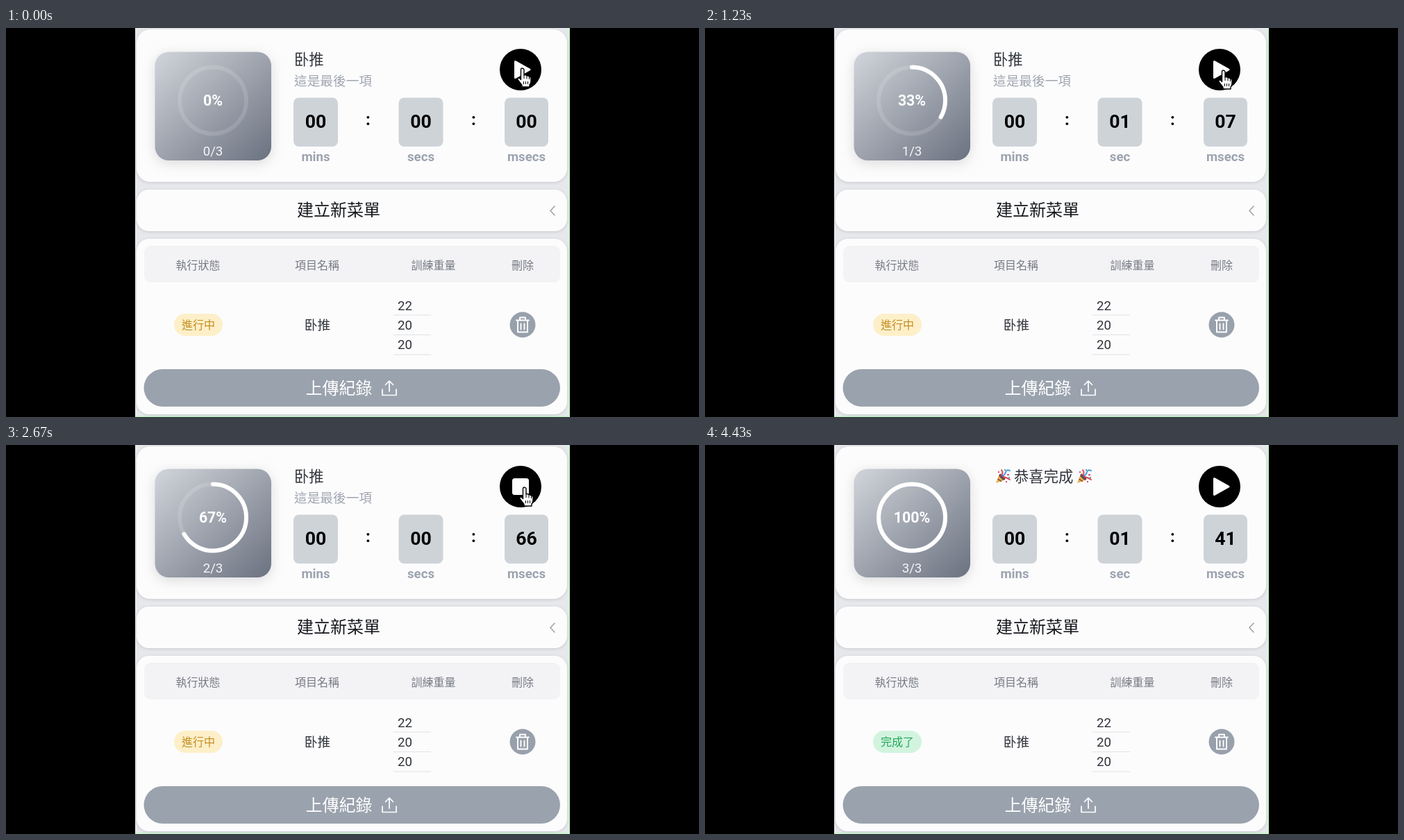
These frames come from a looping animation (998x561 px, 4.46 s). An HTML page:

```html
<!DOCTYPE html>
<html lang="zh-Hant">
<head>
<meta charset="utf-8">
<title>Workout timer</title>
<style>
  html, body { margin: 0; width: 100%; height: 100%; overflow: hidden; background: #000; }
  svg { display: block; width: 998px; height: 561px; }
  text { font: 400 18.67px Roboto, "Noto Sans CJK TC", "Noto Sans CJK JP", "Noto Sans CJK", sans-serif; fill: #30343a; }
  .mid text, text.mid { text-anchor: middle; }
  .card { fill: #fcfcfd; filter: drop-shadow(0 1px 2px #0002); }
  .digits text { font-size: 26.67px; font-weight: 700; fill: #000; }
  .digits .colon { font-size: 24px; }
  .units text { font-weight: 700; fill: #9ca3af; }
  .head text { font-size: 16px; font-weight: 500; fill: #777b83; }
  .line { fill: none; stroke-linecap: round; stroke-linejoin: round; }
</style>
</head>
<body>
<svg viewBox="0 0 998 561">
  <defs>
    <linearGradient id="steel" x1="0" y1="0" x2="1" y2="1">
      <stop stop-color="#d1d5db"/><stop offset="1" stop-color="#6b7280"/>
    </linearGradient>
    <g id="popper">
      <path d="M0 20 5 7 13 15Z" fill="#e8b04a"/>
      <path d="M2.5 14 8 17.5M4.5 9 11 15.5" stroke="#8b5a3c" stroke-width="1.5"/>
      <ellipse cx="9" cy="11" rx="5.6" ry="2.6" transform="rotate(45 9 11)" fill="#6b4a55"/>
      <path class="line" d="M8 8Q11 5 8 1M11 11Q16 12 20 15" stroke="#e0455a" stroke-width="2"/>
      <path class="line" d="M10 9Q13 8 14 4T20 2" stroke="#4a9bd4" stroke-width="2"/>
      <path d="M3 3h2v2h-2zM16 7h3v2h-3zM14 17h2v2h-2z" fill="#d84c7c"/>
      <path d="M12 0h2v2h-2zM18 11h2v2h-2z" fill="#48a9a0"/>
    </g>
  </defs>

  <path d="M186 0h626v561H186z" fill="#e7e8ec"/>
  <path d="M811 0V560H186" fill="none" stroke="#cbf3cd" stroke-width="2"/>
  <rect class="card" x="188" y="2" width="620" height="220" rx="20"/>
  <rect class="card" x="188" y="233" width="620" height="60" rx="18"/>
  <rect class="card" x="188" y="304" width="620" height="253" rx="18"/>

  <!-- progress tile -->
  <rect x="214.500" y="34.500" width="167.500" height="156.500" rx="20" fill="url(#steel)" style="filter:drop-shadow(0 4px 9px #0002)"/>
  <g class="line" stroke="#fff" stroke-width="6">
    <circle cx="298" cy="104.500" r="48" stroke-opacity=".13"/>
    <circle id="ring" cx="298" cy="104.500" r="48" pathLength="100" transform="rotate(-90 298 104.500)"/>
  </g>
  <g class="mid">
    <text id="percent" x="298" y="111.500" style="font-size:21.33px;font-weight:700;fill:#fff"></text>
    <text id="sets" x="298" y="183.500" style="fill:#f4f5f7"></text>
  </g>

  <!-- stopwatch -->
  <g id="current">
    <text x="415" y="52.500" style="font-size:21.33px">卧推</text>
    <text x="415" y="82.500" style="fill:#a0a6b0">這是最後一項</text>
  </g>
  <g id="finished">
    <use href="#popper" x="419" y="35"/>
    <text x="445" y="52.500" style="font-size:21.33px">恭喜完成</text>
    <use href="#popper" x="536" y="35"/>
  </g>
  <g fill="#ced3d8">
    <rect x="414" y="100.500" width="64" height="70.500" rx="8"/>
    <rect x="565.500" y="100.500" width="64" height="70.500" rx="8"/>
    <rect x="718" y="100.500" width="63" height="70.500" rx="8"/>
  </g>
  <g class="mid digits">
    <text x="446" y="144">00</text>
    <text class="colon" x="521.500" y="140">:</text>
    <text id="secs" x="597.500" y="144"></text>
    <text class="colon" x="673.500" y="140">:</text>
    <text id="cents" x="749.500" y="144"></text>
  </g>
  <g class="mid units">
    <text x="446" y="192">mins</text>
    <text id="unit" x="597.500" y="192"></text>
    <text x="749.500" y="192">msecs</text>
  </g>
  <circle cx="741" cy="60" r="30"/>
  <path id="play" class="line" d="M733.500 48.500V71.500L754 60Z" style="fill:#fff" stroke="#fff" stroke-width="3"/>
  <rect id="stop" x="729" y="48" width="24" height="24" rx="3.500" fill="#fff"/>

  <!-- new menu -->
  <text class="mid" x="479" y="270.500" style="font-size:24px;font-weight:500;fill:#16191d">建立新菜單</text>
  <path class="line" d="M790 257 784 263.500 790 270" stroke="#a2a39c" stroke-width="1.600"/>

  <!-- table -->
  <rect x="199" y="314" width="599" height="53" rx="9" fill="#f3f3f6"/>
  <g class="mid head">
    <text x="276.500" y="347.500">執行狀態</text>
    <text x="448" y="347.500">項目名稱</text>
    <text x="615.500" y="347.500">訓練重量</text>
    <text x="744" y="347.500">刪除</text>
  </g>
  <rect id="badge" x="242" y="412" width="70" height="32" rx="16"/>
  <text id="status" class="mid" x="277" y="433.500" style="font-size:16px"></text>
  <text class="mid" x="448.500" y="434.500">卧推</text>
  <text x="564" y="406.500">22</text>
  <text x="564" y="434.500">20</text>
  <text x="564" y="463">20</text>
  <path d="M558 414h54M558 442.500h54M558 471h54" stroke="#dfe1e5"/>
  <circle cx="744" cy="428" r="18.500" fill="#98a0ab"/>
  <path class="line" d="M735 421.500h18M740 421v-3.500h8v3.500M737 422v16.500h14v-16.500M741.500 426.500v8M746.500 426.500v8" stroke="#fff" stroke-width="1.900"/>

  <!-- upload -->
  <rect x="198.500" y="492" width="599.500" height="54" rx="27" fill="#9aa2ad"/>
  <text class="mid" x="479.500" y="527.500" style="font-size:24px;font-weight:300;fill:#fff">上傳紀錄</text>
  <path class="line" d="M552 524V509M546.500 514.500 552 509 557.500 514.500M542 521v8.500h20v-8.500" stroke="#fff" stroke-width="1.700"/>

  <g id="cursor">
    <path d="M-2.500 2Q-2.500 0 -.5 0T2 2V10Q4.500 8.500 6 11Q8.500 10 9.500 12.500Q12 12 12 15V19Q12 22 10 24V27H-1V24.500L-7 16.500Q-7.500 13.500 -5 14L-2.500 16.500Z" fill="#fff" stroke="#000" stroke-width="1.400" stroke-linejoin="round"/>
    <path d="M2 10v5M6 11.500v4M9.500 13v3M1.500 19v4M4.500 19v4M7.500 19v4" stroke="#000"/>
  </g>
</svg>
<script>
const LOOP = 4460, SPEED = 1.5, SETS = 3;
// each set: start in ms, stopwatch reading in hundredths when stopped
const rounds = [[283, 107], [1330, 108], [2230, 141]]
  .map(([start, total]) => ({ start, total, end: start + total * 10 / SPEED }));

const $ = id => document.getElementById(id);
const show = (id, on) => $(id).style.display = on ? '' : 'none';
const two = n => String(n).padStart(2, '0');
const clamp = x => Math.min(1, Math.max(0, x));
const ease = x => { x = clamp(x); return x * x * (3 - 2 * x); };

function draw(t) {
  const round = rounds.filter(r => t >= r.start).pop();
  const running = !!round && t < round.end;
  const count = round ? Math.min(round.total, Math.floor((t - round.start) * SPEED / 10)) : 0;
  const done = rounds.filter(r => t >= r.end).length;
  const finished = done === SETS;

  const secs = Math.floor(count / 100);
  $('secs').textContent = two(secs);
  $('cents').textContent = two(count % 100);
  $('unit').textContent = secs === 1 ? 'sec' : 'secs';

  const fill = rounds.reduce((sum, r) => sum + ease((t - r.end) / 180), 0) / SETS * 100;
  $('ring').setAttribute('stroke-dasharray', fill >= 100 ? 'none' : `${fill} 200`);
  show('ring', fill > 0);
  $('percent').textContent = Math.round(done / SETS * 100) + '%';
  $('sets').textContent = `${done}/${SETS}`;

  show('current', !finished);
  show('finished', finished);
  show('play', !running);
  show('stop', running);
  $('badge').style.fill = finished ? '#d2f4df' : '#fdefc8';
  $('status').style.fill = finished ? '#24a658' : '#c38d22';
  $('status').textContent = finished ? '完成了' : '進行中';

  const settle = ease(t / 200), leave = ease((t - 3800) / 300);
  $('cursor').setAttribute('transform',
    `translate(${744 + 3 * settle + 18 * leave} ${58 + 3 * settle - 95 * leave})`);
}

function tick(now) {
  draw(now % LOOP);
  requestAnimationFrame(tick);
}
draw(0);
requestAnimationFrame(tick);
</script>
</body>
</html>
```
